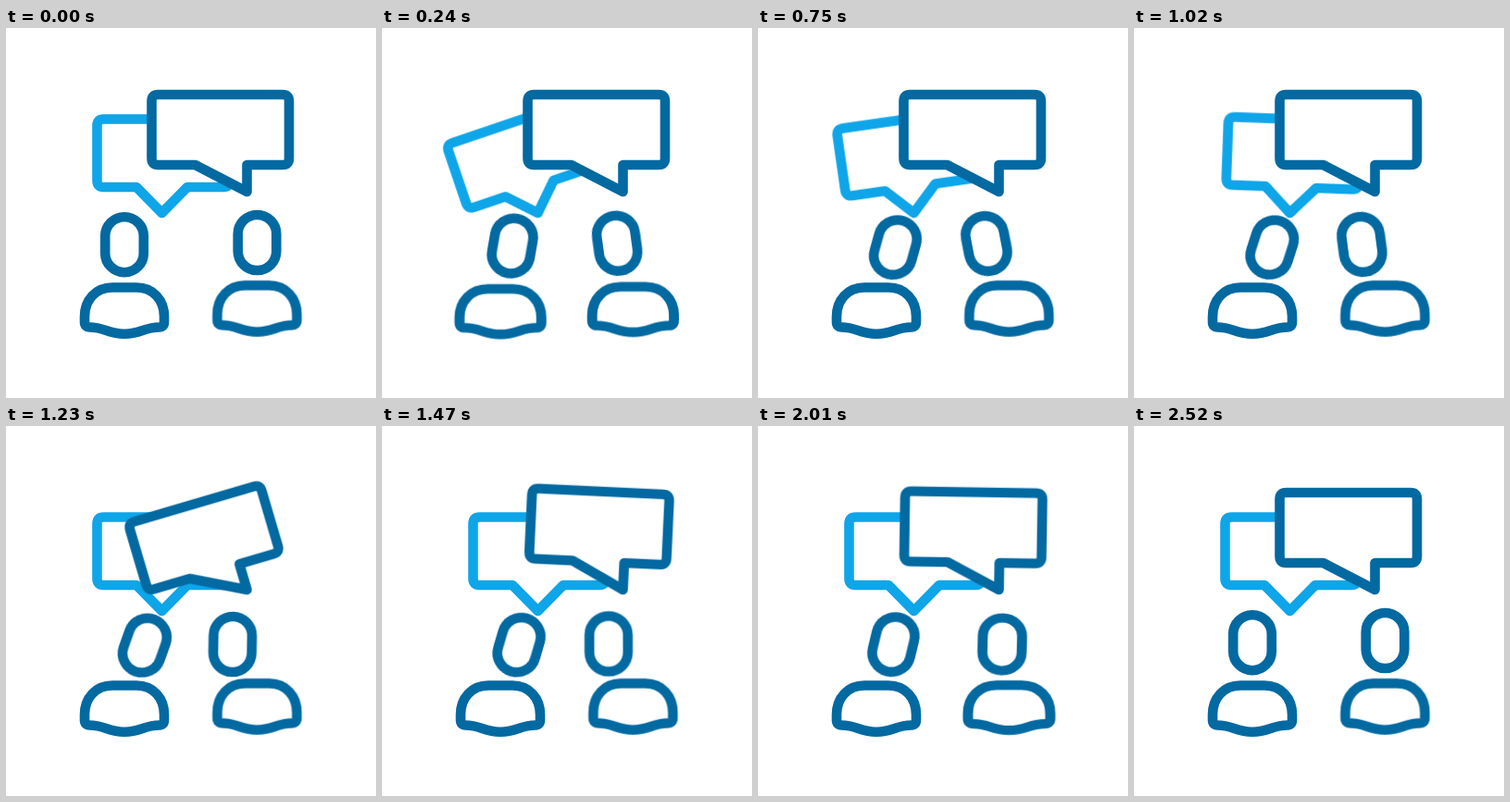
These frames come from a looping animation (400 px wide and 400 px high, 4550 ms). An HTML page:

```html
<!DOCTYPE html>
<html lang="en">
<head>
<meta charset="utf-8">
<title>Conversation</title>
<style>
  html, body { margin: 0; width: 100%; height: 100%; overflow: hidden; background: #fff; }
  svg { display: block; width: 100%; height: 100%; }
  .ink { fill: none; stroke: #0369a1; stroke-width: 10.6; stroke-linecap: round; stroke-linejoin: round; }
  .ink g, .ink path, .ink rect { animation: 4550ms cubic-bezier(.37, 0, .63, 1) infinite; }

  #back { fill: #fff; stroke: #0ea5e9; transform-origin: 168.5px 200px; animation-name: back; }
  #front { fill: #fff; transform-origin: 260.5px 177px; animation-name: front; }
  #headL { transform-origin: 128px 234px; animation-name: headL; }
  #headR { transform-origin: 271.5px 232px; animation-name: headR; }
  #bodyL { transform-origin: 128px 331px; animation-name: bodyL; }
  #bodyR { transform-origin: 128px 331px; animation-name: bodyR; }

  /* Bubbles swing on their tips and settle */
  @keyframes back {
    0%, 26.37%, 100% { transform: rotate(0deg); }
    4.62% { transform: rotate(-20deg); }
    10.11% { transform: rotate(15deg); }
    16.26% { transform: rotate(-8.2deg); }
    21.76% { transform: rotate(2.2deg); }
  }
  @keyframes front {
    0%, 23.74%, 52.75%, 100% { transform: rotate(0deg); }
    28.35% { transform: rotate(-20deg); }
    34.95% { transform: rotate(14.3deg); }
    40% { transform: rotate(-8deg); }
    45.6% { transform: rotate(2.4deg); }
  }

  /* Heads lean together, nod, then part */
  @keyframes headL {
    0%, 53.19%, 100% { transform: translate(0, 0) rotate(0deg) scale(1); }
    8.35% { transform: translate(18.5px, 2px) rotate(14deg) scale(1); }
    16.48% { transform: translate(20.5px, 3px) rotate(15.5deg) scale(1); }
    27.47% { transform: translate(22px, 3px) rotate(19.5deg) scale(1); }
    36.92% { transform: translate(18.5px, 2px) rotate(13.5deg) scale(1); }
    44.4% { transform: translate(18.5px, 2px) rotate(13.5deg) scale(1); animation-timing-function: ease-in; }
    49.23% { transform: translate(7.5px, 2.8px) rotate(2deg) scale(1.02, .95); animation-timing-function: ease-out; }
  }
  @keyframes headR {
    0%, 48.79%, 100% { transform: translate(0, 0) rotate(0deg) scale(1); }
    8.35%, 19.78% { transform: translate(-24.5px, 1px) rotate(-11deg) scale(1); }
    27.03% { transform: translate(-26.5px, 4px) rotate(1deg) scale(1); }
    36.92% { transform: translate(-26.5px, 3px) rotate(-1deg) scale(1); }
    39.12% { transform: translate(-26.5px, 3px) rotate(-1deg) scale(1); animation-timing-function: ease-in; }
    44.18% { transform: translate(-7.5px, 4px) rotate(1.5deg) scale(1.02, .95); animation-timing-function: ease-out; }
  }

  /* Shoulders squash as the heads move */
  @keyframes bodyL {
    0%, 8.35%, 44.4%, 54.07%, 100% { transform: none; }
    3.96%, 48.13% { transform: translateY(.4px) scale(1.035, .97); }
  }
  @keyframes bodyR {
    0%, 8.35%, 39.12%, 49.67%, 100% { transform: none; }
    3.96%, 43.96% { transform: translateY(.4px) scale(1.035, .97); }
  }
</style>
</head>
<body>
<svg viewBox="0 0 400 400" aria-hidden="true">
  <defs>
    <path id="body" d="M85 318V312C85 294 97 280.500 115 280.500H141C159 280.500 171 294 171 312V318Q171 323.500 165.500 323.500C149 323.500 146 330.800 128 330.800C110 330.800 107 323.500 90.500 323.500Q85 323.500 85 318Z"/>
  </defs>
  <g class="ink">
    <path id="back" d="M105.500 98.500H235Q242 98.500 242 105.500V165Q242 172 235 172H196L168.500 200L141 172H105.500Q98.500 172 98.500 165V105.500Q98.500 98.500 105.500 98.500Z"/>
    <path id="front" d="M164.500 72H299Q306 72 306 79V141Q306 148 299 148H260.500V177L204.500 148H164.500Q157.500 148 157.500 141V79Q157.500 72 164.500 72Z"/>
    <rect id="headL" x="107.200" y="204.200" width="41.600" height="60" rx="20.800"/>
    <rect id="headR" x="250.700" y="202" width="41.600" height="60" rx="20.800"/>
    <g id="bodyL"><use href="#body"/></g>
    <g transform="translate(143.400 -2.300)"><g id="bodyR"><use href="#body"/></g></g>
  </g>
</svg>
</body>
</html>
```
